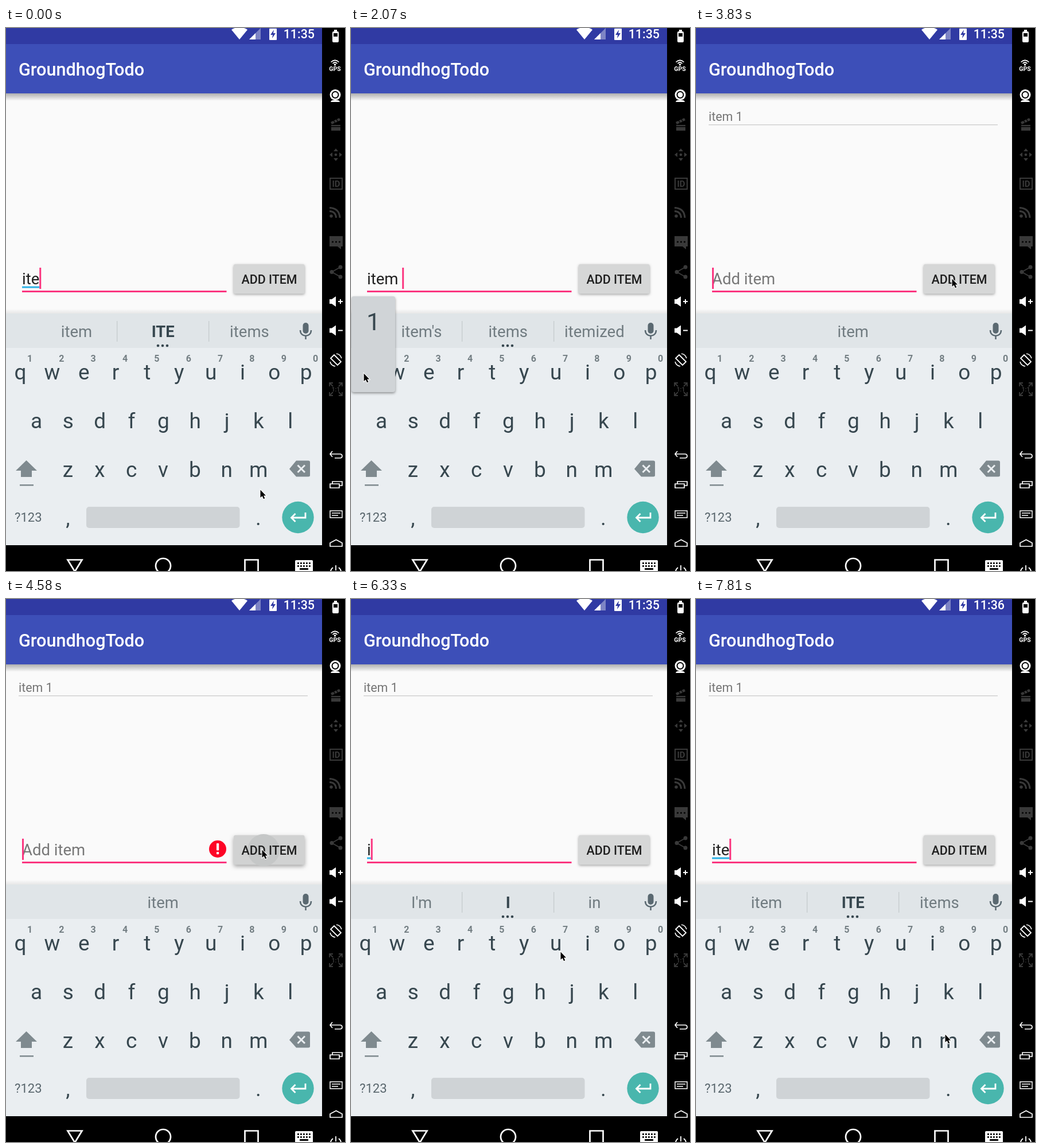
Recreate the animation shown at these times as an HTML page with a canvas. Size 591 by 947 pixels, loop 8000 ms.

```html
<!DOCTYPE html>
<html lang="en">
<head>
<meta charset="utf-8">
<title>Todo demo</title>
<style>
html, body { margin: 0; width: 100%; height: 100%; overflow: hidden; background: #000; }
canvas { display: block; }
</style>
</head>
<body>
<canvas id="stage" width="591" height="947"></canvas>
<script>
const ctx = document.getElementById('stage').getContext('2d');
const LOOP = 8000;
const INK = '#37474f', PINK = '#fb357f', WHITE = '#fff', DIM = '#393939', RED = '#fd0526';
const ROWS = [['qwertyuiop', 25, 613], ['asdfghjkl', 53, 698], ['zxcvbnm', 108, 783]];
const PITCH = 55.35;

// Each step changes part of the state and holds until the next one.
const STEPS = [
  [0, { text: 'ite', composing: true, caret: true, words: ['item', 'ITE', 'items'], dividers: true,
        popup: '', mouse: [443, 805], clock: '11:35', listed: false, error: false, bubble: false, ripple: 0 }],
  [150, { popup: 'm', text: 'item', words: ['items', 'item', "item's"] }],
  [450, { popup: '', mouse: [428, 811] }],
  [590, { mouse: [345, 842] }],
  [740, { mouse: [307, 853] }],
  [1040, { text: 'item ', composing: false, words: ["item's", 'items', 'itemized'] }],
  [1190, { mouse: [22, 602] }],
  [1480, { popup: 'q', caret: false }],
  [1920, { popup: '1', caret: true }],
  [2510, { popup: '', text: 'item 1', words: [] }],
  [2660, { mouse: [130, 568] }],
  [2800, { mouse: [360, 490] }],
  [2940, { mouse: [433, 461] }],
  [3090, { mouse: [447, 440], caret: false }],
  [3240, { ripple: 16 }],
  [3390, { ripple: 28, text: '', listed: true, caret: true }],
  [3540, { ripple: 0 }],
  [3830, { words: ['', 'item', ''], dividers: false, mouse: [446, 437] }],
  [3980, { caret: false }],
  [4430, { ripple: 16, caret: true }],
  [4580, { ripple: 28, error: true }],
  [4880, { ripple: 0, bubble: true }],
  [5030, { caret: false, mouse: [398, 848] }],
  [5450, { caret: true, mouse: [405, 700] }],
  [5590, { mouse: [408, 630] }],
  [5880, { caret: false }],
  [6030, { popup: 'i', text: 'i', composing: true, caret: true, error: false, bubble: false,
           dividers: true, words: ["I'm", 'I', 'in'] }],
  [6330, { popup: '', mouse: [365, 615] }],
  [6480, { mouse: [290, 605] }],
  [6630, { mouse: [246, 603] }],
  [6770, { popup: 't', text: 'it', words: ['item', 'it', 'in'] }],
  [6920, { mouse: [215, 599] }],
  [7070, { mouse: [149, 596] }],
  [7220, { popup: 'e', text: 'ite', words: ['item', 'ITE', 'items'] }],
  [7520, { popup: '', mouse: [190, 618], clock: '11:36' }],
  [7660, { mouse: [340, 702] }],
  [7810, { mouse: [434, 759] }],
];

const stateAt = t => Object.assign({}, ...STEPS.filter(s => s[0] <= t).map(s => s[1]));

function rect(x, y, w, h, color, radius = 0) {
  ctx.fillStyle = color;
  ctx.beginPath();
  ctx.roundRect(x, y, w, h, radius);
  ctx.fill();
}
function disc(x, y, r, color) {
  ctx.fillStyle = color;
  ctx.beginPath();
  ctx.arc(x, y, r, 0, 7);
  ctx.fill();
}
function fill(d, color) {
  ctx.fillStyle = color;
  ctx.fill(new Path2D(d));
}
function line(d, color, width = 2) {
  ctx.strokeStyle = color;
  ctx.lineWidth = width;
  ctx.stroke(new Path2D(d));
}
function label(text, x, y, size, color, align = 'left', weight = 400) {
  ctx.font = `${weight} ${size}px Roboto, sans-serif`;
  ctx.textAlign = align;
  ctx.fillStyle = color;
  ctx.fillText(text, x, y);
}
function fade(y, h, from, to) {
  const g = ctx.createLinearGradient(0, y, 0, y + h);
  g.addColorStop(0, from);
  g.addColorStop(1, to);
  rect(0, y, 551, h, g);
}
function shadowed(blur, dy, alpha, draw) {
  ctx.save();
  ctx.shadowBlur = blur;
  ctx.shadowOffsetY = dy;
  ctx.shadowColor = `rgba(0,0,0,${alpha})`;
  draw();
  ctx.restore();
}

function drawHeader(s) {
  rect(0, 0, 551, 947, '#fafafa');
  fade(114, 13, 'rgba(0,0,0,.3)', 'rgba(0,0,0,0)');
  rect(0, 0, 551, 28, '#303aa3');
  rect(0, 28, 551, 86, '#3d4fb8');
  label('GroundhogTodo', 22, 83, 30.6, WHITE, 'left', 500);
  fill('M393 3Q407 -6 421 3L407 20Z', WHITE);
  fill('M424 20L444 0V20Z', '#7d84c5');
  fill('M424 20L435 9V20Z', WHITE);
  rect(459, 1, 13, 20, WHITE, 1);
  fill('M467 3L461 12H465L464 18L470 9H466Z', '#303aa3');
  label(s.clock, 538, 18, 21.4, WHITE, 'right', 500);
}

function drawForm(s) {
  if (s.listed) {
    label('item 1', 22, 162, 21.4, '#757575');
    rect(22, 168, 504, 1.5, '#d2d2d2');
  }
  label(s.text || 'Add item', 28, 447, 27.5, s.text ? '#212121' : '#777');
  const width = s.text ? ctx.measureText(s.text).width : 0;
  if (s.composing) rect(28, 450.5, width, 3, '#2cb2e6');
  rect(28, 458, 356.5, 3, PINK);
  if (s.caret) rect(28 + width, 418, 3, 37, PINK);

  shadowed(s.ripple ? 7 : 4, s.ripple ? 3 : 1.5, .35, () =>
    rect(397, 412, 123.5, 51.5, s.ripple ? '#d1d2d2' : '#d6d7d7', 3));
  if (s.ripple) disc(449, 438, s.ripple, '#c5c7c7');
  label('ADD ITEM', 459, 445.5, 21.4, '#1e1e1e', 'center', 500);

  if (s.error) {
    disc(369, 436, 15, RED);
    rect(367, 426, 4.2, 12.5, WHITE, 1);
    rect(367, 441, 4.2, 4.2, WHITE, 1);
  }
  if (s.bubble) {
    shadowed(8, 3, .4, () => rect(149, 350.5, 252.5, 54, '#1a1a1a', 1));
    rect(149, 402, 252.5, 3, RED);
    fill('M364 404H380L372 413Z', RED);
    label('Item cannot be empty', 170, 386, 21.4, '#f5f5f5');
  }
}

function drawKeyboard(s) {
  fade(490, 8, 'rgba(0,0,0,0)', 'rgba(0,0,0,.08)');
  rect(0, 498, 551, 61, '#e0e5e8');
  rect(0, 558, 551, 344, '#eaeef1');
  if (s.dividers) for (const x of [193, 353]) rect(x, 511, 1.3, 36, '#c5cbce');
  s.words.forEach((word, i) => {
    const main = i === 1 && s.composing;
    label(word, 123 + i * 150.7, 539, 27.5, main ? INK : '#707b80', 'center', main ? 700 : 400);
  });
  if (s.dividers && s.words.length) for (const x of [265, 273, 281]) disc(x, 554, 2.3, INK);

  rect(517.5, 514, 10, 19, '#5a6971', 5);
  line('M513 527C513 540 532 540 532 527M522.5 536V543', '#5a6971', 2.5);

  for (const [keys, x, y] of ROWS)
    [...keys].forEach((key, i) => label(key, x + i * PITCH, y, 37, INK, 'center'));
  [...'1234567890'].forEach((n, i) => label(n, 41.5 + i * PITCH, 582, 16, '#737e83', 'center', 700));

  fill('M35.5 754L54 772H45V783H26V772H17Z', '#7f8a8f');
  rect(24, 796, 24, 2.5, '#7f8a8f');
  fill('M494 769L506 754.5H527Q530 754.5 530 757V780Q530 782.5 527 782.5H506Z', '#7f8a8f');
  line('M508.5 762.5L521 775M521 762.5L508.5 775', '#eaeef1', 3);
  label('?123', 15, 861, 22, '#59666d');
  label(',', 108, 867, 37, INK, 'center');
  label('.', 440, 867, 37, INK, 'center');
  rect(140, 835, 267.5, 37, '#cfd3d6', 5);
  disc(509, 853.5, 27.7, '#49b6ad');
  line('M522 845V854H498M504.5 847L497.5 854L504.5 861', WHITE, 2.8);
}

function drawPopup(key) {
  if (!key) return;
  const row = key === '1' ? ROWS[0] : ROWS.find(r => r[0].includes(key));
  const [keys, start, base] = row;
  const x = Math.max(start + Math.max(keys.indexOf(key), 0) * PITCH, 39);
  shadowed(4, 2, .4, () => rect(x - 38, base - 145, 76, 167, '#d0d4d7', 4));
  label(key, x, base - 86, 43, INK, 'center');
  if (row === ROWS[0] && key !== '1')
    for (const dx of [15, 22, 29]) rect(x + dx, base - 67.5, 3.5, 3.5, '#8b9599');
}

function drawNavBar() {
  rect(0, 902, 551, 45, '#000');
  line('M107.5 927.5H132.5L120 948Z', WHITE, 2.7);
  line('M261 938a13 13 0 1 0 26 0a13 13 0 1 0 -26 0', WHITE, 2.7);
  line('M416.5 927.5H439.5V950H416.5Z', WHITE, 2.7);
  rect(504, 928, 31, 22, WHITE, 2);
  for (let i = 0; i < 10; i++) rect(508 + i % 5 * 5, 932 + (i > 4) * 5, 2.8, 2.8, '#000');
  rect(512, 942, 15, 3, '#000');
}

function drawSidebar() {
  rect(551, 0, 40, 947, '#000');
  rect(569, 6, 11, 19, WHITE, 2);
  rect(572, 3, 5, 4, WHITE);
  rect(571, 9, 7, 6, '#000');
  disc(573.5, 64, 1.8, WHITE);
  line('M569.5 62Q573.5 58 577.5 62M566.5 59.5Q573.5 53 580.5 59.5', WHITE, 1.7);
  label('GPS', 573.5, 75, 10.5, WHITE, 'center', 700);

  disc(574, 116.5, 9.5, WHITE);
  disc(574, 116.5, 6.5, '#000');
  disc(574, 116.5, 4.5, WHITE);
  fill('M566 129Q567 125 574 126Q581 125 582 129Z', WHITE);

  fill('M567 169H583V179H567ZM566 164L581 157L583 161L568 168Z', DIM);
  line('M571 161L574 166M576 159L579 164M567 172H583', '#000', 1.3);
  fill('M575 210L579 215H571ZM575 232L579 227H571ZM564 221L569 217V225ZM586 221L581 217V225Z', DIM);
  disc(575, 221, 2.3, DIM);
  line('M565 262H586V281H565Z', DIM, 2);
  label('ID', 575.5, 277, 15, DIM, 'center', 700);

  disc(567, 328, 2.8, DIM);
  line('M564 319.5Q575 320 575.5 331M564 313.5Q581 314 582 331', DIM, 3);
  fill('M564 363H587V381H584V386L578 381H564Z', DIM);
  for (const x of [569.5, 575.5, 581.5]) disc(x, 373, 1.6, '#000');
  line('M583 417L568 425.5L583 434', DIM, 2);
  for (const [x, y] of [[583, 417], [568, 425.5], [583, 434]]) disc(x, y, 3.5, DIM);

  for (const y of [477, 527.5]) {
    fill(`M564 ${y - 4}H568L575 ${y - 9}V${y + 9}L568 ${y + 4}H564Z`, WHITE);
    line(`M579 ${y}H587` + (y < 500 ? 'M583 473V481' : ''), WHITE, 2);
  }
  line('M572 570L584 582L578 588L566 576Z', WHITE, 1.8);
  line('M576 568Q583 569 585 576M574 590Q567 589 565 582', WHITE, 1.6);
  line('M564 625V619H570M564 619L570 625M580 619H586V625M586 619L580 625' +
       'M564 635V641H570M564 641L570 635M580 641H586V635M586 641L580 635', DIM, 1.8);
  label('1:1', 575, 634, 10, DIM, 'center', 700);

  line('M569 738L565 743L569 748M565 743H582Q586 743 586 746.5T582 750H573', WHITE, 1.7);
  line('M565 795H581V802H565ZM569 795V791H586V798H581', WHITE, 1.7);
  line('M565 842H586V854H565ZM568 846H583M568 850H579', WHITE, 1.5);
  line('M565 904V898L575.5 892.5L586 898V904Z', WHITE, 1.7);
  line('M570 941Q566 944 566 948M580 941Q584 944 584 948M575 937V946', WHITE, 1.8);
}

function drawMouse([x, y]) {
  ctx.save();
  ctx.translate(x, y);
  const arrow = 'M.5 .5V14L3.7 11.2L6 16.3L8.3 15.3L6 10.4H10Z';
  line(arrow, WHITE, 2);
  fill(arrow, '#000');
  ctx.restore();
}

function frame(now) {
  const s = stateAt(now % LOOP);
  drawHeader(s);
  drawForm(s);
  drawKeyboard(s);
  drawPopup(s.popup);
  drawNavBar();
  drawSidebar();
  drawMouse(s.mouse);
  requestAnimationFrame(frame);
}
requestAnimationFrame(frame);
</script>
</body>
</html>
```
